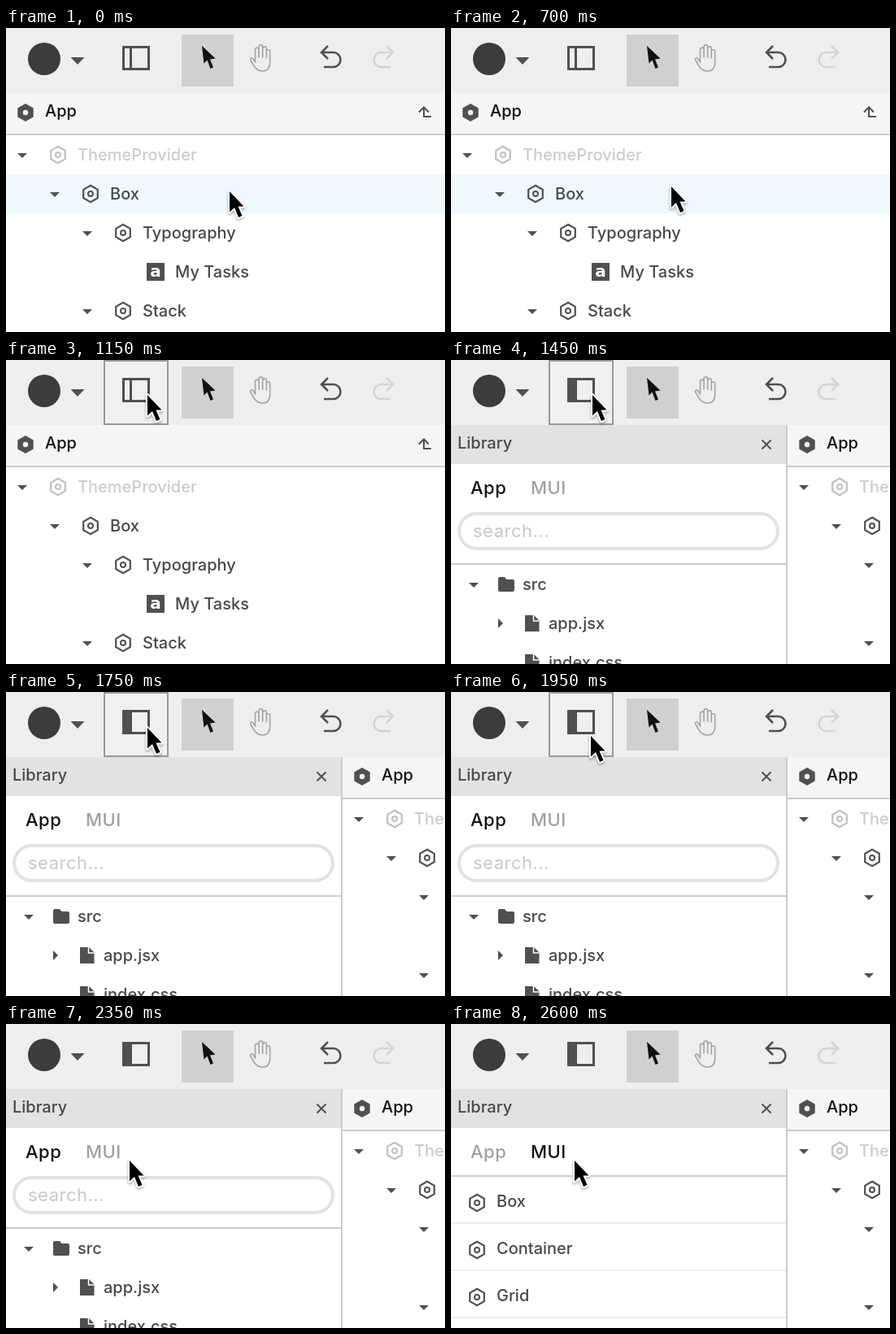
Animation, 540 px wide and 374 px high, one loop 4.15 s. Source, as an HTML page:

```html
<!DOCTYPE html>
<html lang="en">
<head>
<meta charset="utf-8">
<title>Library panel</title>
<style>
html, body { margin: 0; width: 100%; height: 100%; overflow: hidden; background: #fff; }
svg { display: block; width: 100%; height: 100%; }
text { font: 500 20px Inter, sans-serif; fill: #484848; white-space: pre; }
.title { fill: #111; }
.dim { opacity: .36; }
.tab { font-size: 22px; letter-spacing: .5px; fill: #a0a0a0; }
.on { fill: #111; }
.hint { font-weight: 400; font-size: 22px; letter-spacing: .5px; fill: #c8c8c8; }
.glyph { font: 700 20px "DejaVu Sans", sans-serif; fill: #fff; text-anchor: middle; }
.line { fill: none; stroke: #505050; stroke-width: 2; }
.solid { fill: #505050; }

/* One loop is 4150 ms; every change is a hard step. */
.hover, .tree, .press, .closed, .open, .files, .kit, .cursor {
  animation: 4150ms step-end infinite;
}
.hover { animation-name: hover; }
.tree { animation-name: shift; }
.press { animation-name: press; }
.closed { animation-name: until-open; }
.open { animation-name: from-open; }
.files { animation-name: until-kit; }
.kit { animation-name: from-kit; }
.cursor { animation-name: move; filter: drop-shadow(0 2px 1.5px rgba(0, 0, 0, .3)); }

@keyframes hover { 0% { opacity: 1 } 19.277%, 100% { opacity: 0 } }
@keyframes shift { 0% { transform: none } 34.939%, 100% { transform: translate(414px, 0) } }
@keyframes press { 0% { opacity: 0 } 24.096% { opacity: 1 } 50.602%, 100% { opacity: 0 } }
@keyframes until-open { 0% { opacity: 1 } 34.939%, 100% { opacity: 0 } }
@keyframes from-open { 0% { opacity: 0 } 34.939%, 100% { opacity: 1 } }
@keyframes until-kit { 0% { opacity: 1 } 62.650%, 100% { opacity: 0 } }
@keyframes from-kit { 0% { opacity: 0 } 62.650%, 100% { opacity: 1 } }
@keyframes move {
  0% { transform: translate(275px, 201px) }
  16.867% { transform: translate(271px, 195px) }
  18.072% { transform: translate(265px, 185px) }
  19.277% { transform: translate(255px, 169px) }
  20.481% { transform: translate(241px, 147px) }
  21.686% { transform: translate(224.5px, 122px) }
  22.891% { transform: translate(208px, 97px) }
  24.096% { transform: translate(194px, 75px) }
  25.301% { transform: translate(183px, 57px) }
  26.506% { transform: translate(176.5px, 47px) }
  27.710% { transform: translate(174px, 43px) }
  40.963% { transform: translate(174px, 44px) }
  43.373% { transform: translate(174px, 45px) }
  44.578% { transform: translate(173.5px, 47px) }
  45.783% { transform: translate(173px, 50px) }
  46.987% { transform: translate(172px, 54px) }
  48.192% { transform: translate(170px, 61px) }
  49.397% { transform: translate(166px, 72px) }
  50.602% { transform: translate(161px, 88px) }
  51.807% { transform: translate(156px, 108px) }
  53.012% { transform: translate(153px, 138px) }
  54.216% { transform: translate(152px, 156px) }
  55.421% { transform: translate(152px, 165px) }
  56.626%, 100% { transform: translate(152px, 168px) }
}
</style>
</head>
<body>
<svg viewBox="0 0 540 374">
  <defs>
    <g id="hex" class="line">
      <path d="M0-10.2 8.8-5.1V5.1L0 10.2-8.8 5.1V-5.1Z" stroke-width="2.2"/>
      <circle r="3"/>
    </g>
    <path id="caret" class="solid" d="M-6-3H6L0 3Z"/>
    <g id="file">
      <path class="solid" d="M91 314h11l6.500 6.500V334H91Z"/>
      <path d="M101.500 314v7h7" fill="none" stroke="#fff" stroke-width="1.500"/>
    </g>
    <path id="back" d="M396 22l-8 8 8 8M388 30h14.500a9 9 0 0 1 0 18H391" fill="none" stroke-width="2.600"/>
  </defs>

  <rect width="540" height="374" fill="#fff"/>

  <g class="tree">
    <rect y="80" width="540" height="50" fill="#f5f5f5"/>
    <rect y="130" width="540" height="2" fill="#ccc"/>
    <path class="solid" d="M24 93l9.700 5.500v11L24 115l-9.700-5.500v-11Z"/>
    <circle cx="24" cy="104" r="3.200" fill="#f5f5f5"/>
    <text class="title" x="48" y="109">App</text>
    <path class="line" d="M523 109h-9V97.500M508 103.500l6-6 6 6"/>
    <rect class="hover" y="180" width="540" height="48" fill="#eff8fc"/>

    <use href="#caret" x="20" y="157"/>
    <use href="#hex" class="dim" x="64" y="156"/>
    <text x="88" y="163" fill-opacity=".28">ThemeProvider</text>
    <use href="#caret" x="60" y="205"/>
    <use href="#hex" x="104" y="204"/>
    <text x="128" y="211">Box</text>
    <use href="#caret" x="100" y="253"/>
    <use href="#hex" x="144" y="252"/>
    <text x="168" y="259">Typography</text>
    <rect class="solid" x="173" y="289" width="22" height="22"/>
    <text class="glyph" x="184" y="306">a</text>
    <text x="208" y="307">My Tasks</text>
    <use href="#caret" x="100" y="349"/>
    <use href="#hex" x="144" y="348"/>
    <text x="168" y="355">Stack</text>
  </g>

  <g class="open">
    <rect y="80" width="412" height="294" fill="#fff"/>
    <rect y="80" width="412" height="48" fill="#e2e2e2"/>
    <rect x="412" y="80" width="2" height="294" fill="#ccc"/>
    <text x="8" y="109">Library</text>
    <path class="line" d="M382.500 98.500l11 11M393.500 98.500l-11 11"/>

    <g class="files">
      <text class="tab on" x="24" y="165">App</text>
      <text class="tab" x="98" y="165">MUI</text>
      <rect x="10" y="189" width="392" height="43" rx="21.500" fill="#fff" stroke="#e2e2e2" stroke-width="4"/>
      <text class="hint" x="27" y="218">search...</text>
      <rect y="250" width="412" height="2" fill="#ccc"/>
      <use href="#caret" x="28" y="277"/>
      <path class="solid" d="M58 269q0-2 2-2h6l2.500 3H76q2 0 2 2v11q0 2-2 2H60q-2 0-2-2Z"/>
      <text x="88" y="283">src</text>
      <path class="solid" d="M58 318l6 6-6 6Z"/>
      <use href="#file"/>
      <text x="120" y="331">app.jsx</text>
      <use href="#file" y="48"/>
      <text x="120" y="379">index.css</text>
    </g>

    <g class="kit">
      <text class="tab" x="24" y="165">App</text>
      <text class="tab on" x="98" y="165">MUI</text>
      <rect y="186" width="412" height="2" fill="#ccc"/>
      <path d="M0 245H412M0 303H412M0 361H412" stroke="#eee" stroke-width="2"/>
      <use href="#hex" x="32" y="220"/>
      <text x="56" y="225">Box</text>
      <use href="#hex" x="32" y="278"/>
      <text x="56" y="283">Container</text>
      <use href="#hex" x="32" y="336"/>
      <text x="56" y="341">Grid</text>
    </g>
  </g>

  <rect width="540" height="80" fill="#eee"/>
  <circle cx="47" cy="38" r="20" fill="#3c3c3c"/>
  <path class="solid" d="M79.500 36h17L88 45Z"/>
  <rect class="press" x="121" y="1" width="78" height="78" fill="#f0f0f0" stroke="#999" stroke-width="2"/>
  <rect class="line" x="144.500" y="23.500" width="31" height="27" style="stroke-width:3"/>
  <path class="line closed" d="M153.500 23V51" style="stroke-width:3"/>
  <rect class="solid open" x="144" y="23" width="11" height="28"/>

  <rect x="216" y="8" width="64" height="64" fill="#d0d0d0"/>
  <path d="M241 22l2.500 21.500 4-4 4 10.500 3.500-1.500-4-10 6.500-1Z" fill="#111"/>
  <path d="M306.500 42V26.500a2.300 2.300 0 0 1 4.600 0V36V23a2.300 2.300 0 0 1 4.600 0V36V25a2.300 2.300 0 0 1 4.600 0V37V29a2.200 2.200 0 0 1 4.400 0V42c0 7-3 11-9 11-5 0-8-2-10.500-6l-4.500-7.500c-1-2 1.500-3.600 3-2Z"
    fill="none" stroke="#a4a4a4" stroke-width="1.600" stroke-linejoin="round"/>
  <use href="#back" stroke="#505050"/>
  <use href="#back" stroke="#d4d4d4" transform="matrix(-1 0 0 1 864 0)"/>

  <g class="cursor">
    <path d="M0 0V25.500L6 20l5 12 4.500-2-5-11.500H17.500Z" fill="#000" stroke="#fff" stroke-width="4"
      stroke-linejoin="round" paint-order="stroke"/>
  </g>
</svg>
</body>
</html>
```
